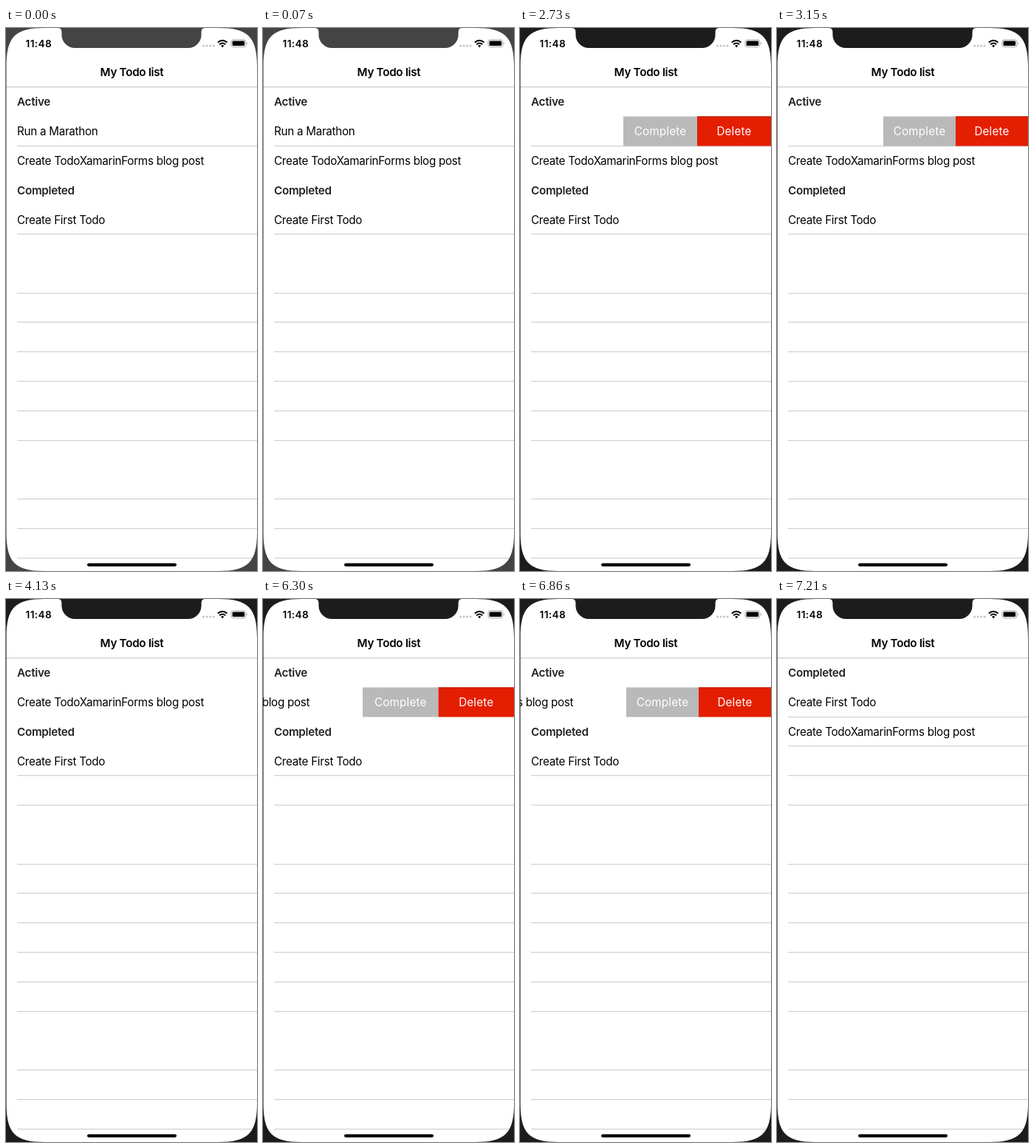
An HTML page that plays this animation: 340x734 px, repeating every 9.1 s.

```html
<!DOCTYPE html>
<html lang="en">
<head>
<meta charset="utf-8">
<title>My Todo list</title>
<style>
  html, body { margin: 0; width: 100%; height: 100%; overflow: hidden; background: #fff; }
  svg { display: block; width: 340px; height: 734px; }
  text { font: 400 15.2px Inter, "Liberation Sans", sans-serif; letter-spacing: -.27px; }
  .bold { font-weight: 600; }
  .header { font-weight: 600; fill: #222; }
  .time { font-size: 13.6px; font-weight: 600; letter-spacing: .4px; }
  .action { fill: #fff; letter-spacing: .2px; text-anchor: middle; }
  .line { fill: #d0d0d1; }
</style>
</head>
<body>
<svg viewBox="0 0 340 734">
  <rect width="340" height="734" fill="#fff"/>
  <text class="bold" x="170.5" y="65.4" text-anchor="middle">My Todo list</text>
  <rect class="line" y="79" width="340" height="1.4"/>
  <g id="list"></g>
  <rect x="110" y="723.4" width="121" height="4.4" rx="2.2"/>

  <g id="bezel">
    <path fill-rule="evenodd" d="M0 0 H340 V734 H0 Z
      M.6 52 C.6 12 12 0 52 0 H288 C328 0 340 12 340 52
      V682 C340 722 328 734 288 734 H52 C12 734 .6 722 .6 682 Z"/>
    <path d="M70 0 Q75.4 0 75.4 5.4 V9 A18 18 0 0 0 93.4 27 H246.6 A18 18 0 0 0 264.6 9 V5.4 Q264.6 0 270 0 Z"/>
  </g>

  <text class="time" x="26.5" y="25.6">11:48</text>
  <g fill="#c4c4c4">
    <circle cx="267.6" cy="24" r="1.5"/><circle cx="272.1" cy="24" r="1.5"/>
    <circle cx="276.6" cy="24" r="1.5"/><circle cx="281.1" cy="24" r="1.5"/>
  </g>
  <g fill="none" stroke="#000" stroke-width="2">
    <path d="M286.9 19.6 Q293.2 13.9 299.5 19.6"/>
    <path d="M289.2 22.2 Q293.2 18.7 297.2 22.2"/>
  </g>
  <path d="M291.1 24 Q293.2 22.2 295.3 24 L293.2 26.2 Z"/>
  <rect x="305" y="16" width="19.8" height="9.6" rx="2.6" fill="none" stroke="#a4a4a4"/>
  <rect x="306.6" y="17.5" width="16.6" height="6.6" rx="1.4"/>
  <path d="M326 19 Q328 20.8 326 22.6 Z" fill="#a4a4a4"/>
</svg>
<script>
const LOOP = 9100, STEP = 70, ROW = 39.8, TOP = 79.05;
const $ = id => document.getElementById(id);
const POST = 'Create TodoXamarinForms blog post', FIRST = 'Create First Todo';

// Headers start with '#'; lines lists the separators that differ between stages.
const stages = [
  { from: 0, rows: ['#Active', 'Run a Marathon', POST, '#Completed', FIRST], lines: [2] },
  { from: 4130, rows: ['#Active', POST, '#Completed', FIRST], lines: [4] },
  { from: 7210, rows: ['#Completed', FIRST, POST], lines: [2, 3, 4] },
];
const sharedLines = [5, 7, 8, 9, 10, 11, 12, 14, 15, 16];

// Each swipe opens past its resting width and settles back.
const swipes = [
  { from: 2730, to: 4130, overshoot: 4, settle: 420 },
  { from: 6300, to: 7210, overshoot: 9, settle: 560 },
];

function swipeWidth(t) {
  const swipe = swipes.find(s => t >= s.from && t < s.to);
  if (!swipe) return 0;
  const age = Math.floor((t - swipe.from) / STEP) * STEP;
  return 196 + (age < swipe.settle ? swipe.overshoot * Math.exp(-age / 170) : 0);
}

const separator = k =>
  `<rect class="line" x="15" y="${Math.round(TOP + ROW * k)}" width="325" height="1.2"/>`;

function row(label, k, shift) {
  const header = label[0] === '#';
  const x = 15 - (k === 1 ? shift : 0);
  return `<text x="${x}" y="${TOP + ROW * k + 26.4}"${header ? ' class="header"' : ''}>` +
    `${header ? label.slice(1) : label}</text>`;
}

function actions(width) {
  const half = width / 2;
  const button = (label, x, color) =>
    `<rect x="${x}" y="119.5" width="${half}" height="40" fill="${color}"/>` +
    `<text class="action" x="${x + half / 2}" y="145.2">${label}</text>`;
  return button('Complete', 340 - width, '#b9b9b9') + button('Delete', 340 - half, '#e41e00') +
    `<rect x="${340 - half}" y="119.5" width="${half}" height="1" fill="#b81800"/>`;
}

let shown = '';
function draw() {
  const t = performance.now() % LOOP;
  const { rows, lines } = stages.findLast(s => t >= s.from);
  const width = swipeWidth(t);
  const list = [...lines, ...sharedLines].map(separator).join('') +
    rows.map((label, k) => row(label, k, width)).join('') +
    (width ? actions(width) : '');
  if (list !== shown) $('list').innerHTML = shown = list;
  $('bezel').setAttribute('fill', t < 1680 ? '#444' : '#1c1c1c');
  requestAnimationFrame(draw);
}
draw();
</script>
</body>
</html>
```
